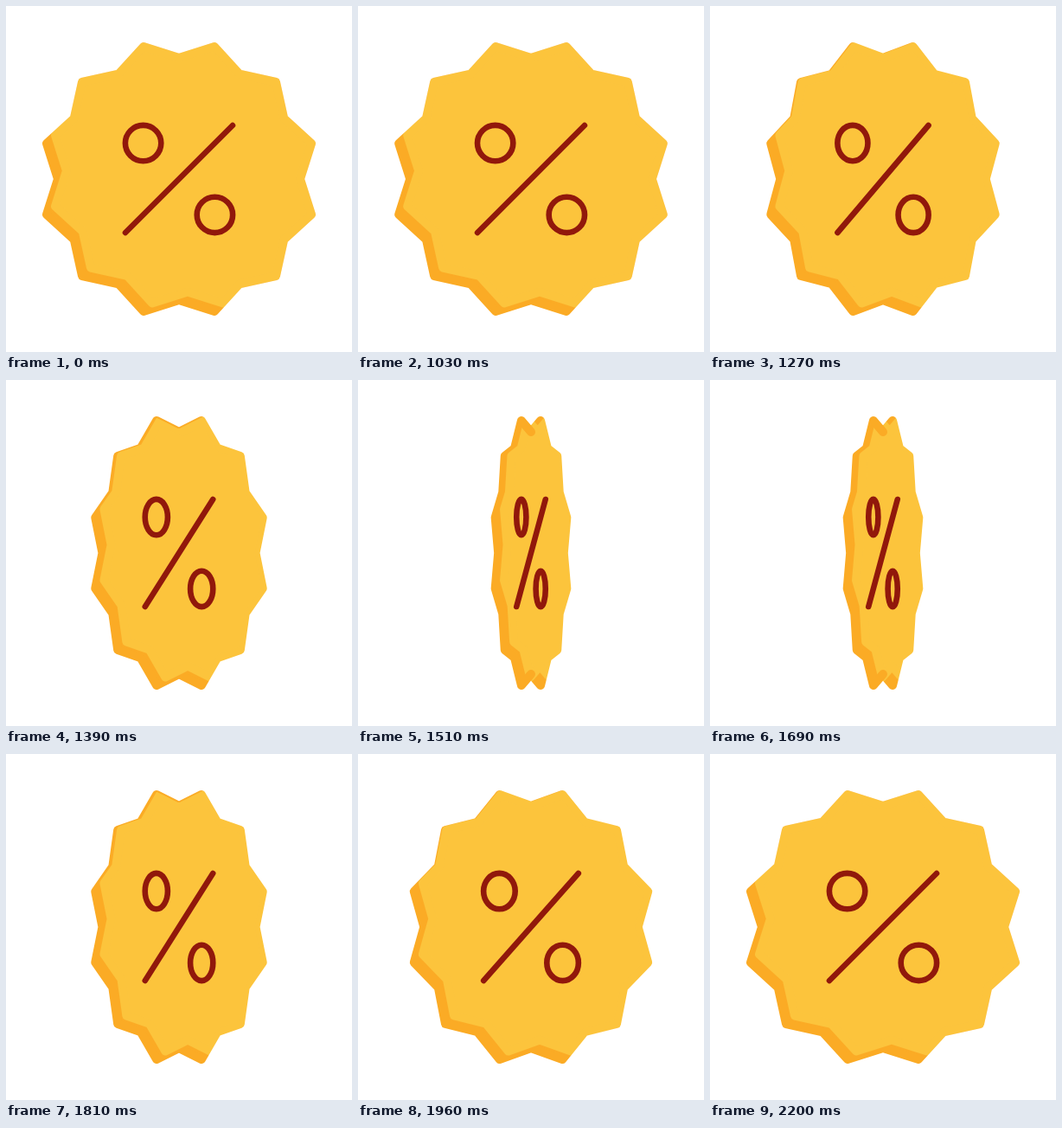
Write an HTML page with a canvas that moves like this. It is 400 px wide and 400 px high and loops after 2230 ms.

```html
<!DOCTYPE html>
<html lang="en">
<head>
<meta charset="utf-8">
<title>Discount badge</title>
<style>
  html, body { margin: 0; width: 100%; height: 100%; overflow: hidden; background: #fff; }
  canvas { display: block; width: 400px; height: 400px; }
</style>
</head>
<body>
<canvas id="stage" width="400" height="400"></canvas>
<script>
const ctx = document.getElementById('stage').getContext('2d');
const LOOP = 2230, MIDDLE = 1600, HALF = 600, STEP = 30;
const LIGHT = '#fcc43c', SHADE = '#fbab25', INK = '#91180b';

// Twelve-pointed star, starting at the top notch and going clockwise.
const star = Array.from({ length: 24 }, (_, i) => {
  const angle = i * Math.PI / 12, radius = i % 2 ? 158.4 : 140;
  return [radius * Math.sin(angle), -radius * Math.cos(angle)];
});

// The lit face is pushed up and right along the lower left side.
const face = star.map(([x, y], i) => i >= 11 && i <= 19 ? [x + 10, y - 9.5] : [x, y]);

const bezier = (a, b, p) => 3 * (1 - p) ** 2 * p * a + 3 * (1 - p) * p * p * b + p ** 3;

function ease(x) {
  let low = 0, high = 1;
  for (let i = 0; i < 24; i++) {
    const mid = (low + high) / 2;
    if (bezier(0.167, 0.31, mid) < x) low = mid; else high = mid;
  }
  return bezier(0.167, 1, low);
}

function trace(points, scale, dx = 0, dy = 0) {
  ctx.beginPath();
  points.forEach(([x, y]) => ctx.lineTo(200 + x * scale + dx, 200 + y + dy));
}

function fillStar(points, color, scale, dx) {
  trace(points, scale, dx);
  ctx.closePath();
  ctx.fillStyle = ctx.strokeStyle = color;
  ctx.fill();
  ctx.stroke();
}

function ring(x, y, scale) {
  ctx.beginPath();
  ctx.ellipse(200 + x * scale, 200 + y, 20.7 * scale, 20.7, 0, 0, 2 * Math.PI);
  ctx.stroke();
}

function draw(scale) {
  ctx.globalCompositeOperation = 'source-over';
  ctx.clearRect(0, 0, 400, 400);
  ctx.lineCap = ctx.lineJoin = 'round';
  ctx.lineWidth = 10;
  fillStar(star, SHADE, scale, 0);

  // Everything else stays inside the badge outline.
  ctx.globalCompositeOperation = 'source-atop';
  fillStar(face, LIGHT, scale, 10.5 * (1 - scale));

  // The rim's folded ends slide in as the badge turns edge-on.
  const away = Math.max(0, (scale - 0.27) * 25);
  ctx.strokeStyle = SHADE;
  trace([star[23], star[0]], scale, 0, -away);
  ctx.stroke();
  trace([star[13], star[12]], scale, 0, away);
  ctx.stroke();

  ctx.strokeStyle = INK;
  ctx.lineWidth = 6.6;
  trace([[-62, 62], [62, -62]], scale);
  ctx.stroke();
  ring(-41.4, -41.4, scale);
  ring(41.4, 41.4, scale);
}

function tick() {
  const time = performance.now() % LOOP;
  const stepped = Math.floor((time - 10) / STEP) * STEP + 10;
  draw(ease(Math.min(1, Math.abs(stepped - MIDDLE) / HALF)));
  requestAnimationFrame(tick);
}
tick();
</script>
</body>
</html>
```
